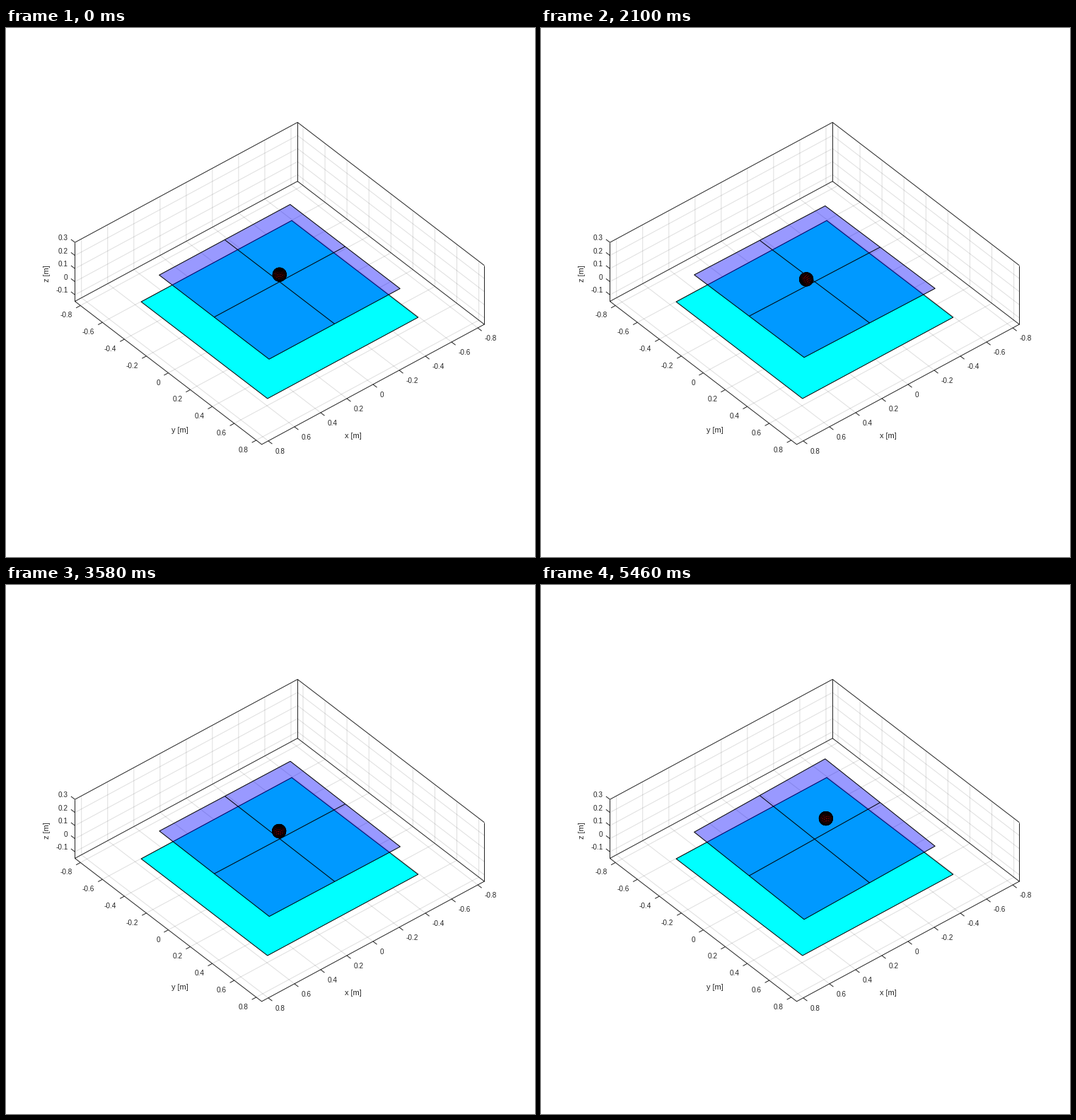
A matplotlib script that plays this animation: 748x748 px, repeating every 5.5 s.

```python
import numpy as np
import matplotlib.pyplot as plt
from matplotlib.animation import FuncAnimation
from matplotlib.collections import LineCollection, PolyCollection

SIZE, DPI = 748, 100
PX = 72 / DPI                      # one pixel in points
STEP, HOLD, TICK, LOOP = 40, 500, 20, 5500
POSES = 1 + (LOOP - HOLD) // STEP
DT = STEP / 1000

# Orthographic view
AZ, EL, SCALE = np.radians(140), np.radians(40), 241.7
ORIGIN = np.array([386.9, 375.0])
VIEW = SCALE * np.array([
    [np.cos(AZ), np.sin(AZ), 0],
    [np.sin(EL) * np.sin(AZ), -np.sin(EL) * np.cos(AZ), -np.cos(EL)]])
TO_EYE = np.array([np.cos(EL) * np.sin(AZ), -np.cos(EL) * np.cos(AZ), np.sin(EL)])

LIM, Z0, Z1 = 0.85, -0.15, 0.3
BASE, BASE_Z, PLATE, PLATE_Z = 0.575, -0.125, 0.5, 0.087
RADIUS, ROLL_G = 0.04, 7.0         # a ball rolls at 5/7 of gravity
INK = "#262626"

# Key poses: step, ball x and y, plate slope along x and y
KEYS = np.array([
    [0, -.011, -.014, 0, 0],
    [8, -.010, -.013, .010, .010],
    [35, .044, .001, -.010, -.021],
    [54, .055, -.050, -.020, .016],
    [78, -.012, -.019, -.005, .010],
    [95, -.094, .042, .006, -.037],
    [125, -.139, -.063, .020, .024]])


def solve_motion():
    """Smoothest plate slopes that roll a resting ball through the key poses."""
    n = np.arange(POSES)
    step = KEYS[:, 0].astype(int)
    start, path, slope = KEYS[0, 1:3], KEYS[:, 1:3], KEYS[:, 3:]
    roll = ROLL_G * DT ** 2 * np.maximum(n[:, None] - n, 0)
    smooth = np.diff(np.eye(POSES), 2, axis=0)
    lhs = np.vstack([1000 * roll[step], 200 * np.eye(POSES)[step], 400 * smooth])
    rhs = np.vstack([1000 * (path - start), 200 * slope, np.zeros((POSES - 2, 2))])
    slopes = np.linalg.lstsq(lhs, rhs, rcond=None)[0]
    return slopes, start + roll @ slopes


SLOPES, TRACK = solve_motion()


def project(points):
    return ORIGIN + np.asarray(points, float) @ VIEW.T


def rotation(vec):
    angle = np.linalg.norm(vec)
    if angle < 1e-9:
        return np.eye(3)
    x, y, z = vec / angle
    k = np.array([[0, -z, y], [z, 0, -x], [-y, x, 0]])
    return np.eye(3) + np.sin(angle) * k + (1 - np.cos(angle)) * k @ k


def sphere_quads(n=20):
    lo, la = np.meshgrid(np.linspace(-np.pi, np.pi, n + 1),
                         np.linspace(-np.pi / 2, np.pi / 2, n + 1))
    p = np.stack([np.cos(la) * np.cos(lo), np.cos(la) * np.sin(lo), np.sin(la)], -1)
    quads = np.stack([p[:-1, :-1], p[:-1, 1:], p[1:, 1:], p[1:, :-1]], 2)
    return quads.reshape(-1, 4, 3)


SPHERE = sphere_quads()
SQUARE = np.array([[-1, -1], [1, -1], [1, 1], [-1, 1], [-1, -1]])
CROSS = [np.array([[-1, 0], [1, 0]]), np.array([[0, -1], [0, 1]])]


def on_plate(shape, slope):
    # The plate pivots below its surface, so it also shifts sideways.
    xy = shape * PLATE
    return project(np.column_stack([xy + PLATE_Z * slope, PLATE_Z - xy @ slope]))


def ball_quads(pos):
    dx, dy = (pos - TRACK[0]) / RADIUS
    quads = SPHERE @ rotation(np.array([-dy, dx, 0])).T
    quads = quads[quads.mean(axis=1) @ TO_EYE > 0]
    return project(quads * RADIUS + [*pos, PLATE_Z + RADIUS])


fig = plt.figure(figsize=(SIZE / DPI, SIZE / DPI), dpi=DPI, facecolor="white")
ax = fig.add_axes([0, 0, 1, 1])
ax.set_xlim(0, SIZE)
ax.set_ylim(SIZE, 0)
ax.axis("off")


def add_lines(paths, z, color=INK, **style):
    lines = LineCollection(paths, colors=color, linewidths=PX, zorder=z, **style)
    return ax.add_collection(lines)


def add_faces(verts, color, z, **style):
    return ax.add_collection(PolyCollection(verts, facecolors=[color], zorder=z, **style))


def label(x, y, text, size=10, **style):
    ax.text(x, y, text, fontsize=size * PX, family="Liberation Sans",
            color=INK, **style)


def draw_axes():
    ticks = np.arange(-4, 5) / 5
    zticks = np.arange(-1, 4) / 10
    grid = []
    for v in ticks:
        grid.append([(v, LIM, Z0), (v, -LIM, Z0), (v, -LIM, Z1)])
        grid.append([(LIM, v, Z0), (-LIM, v, Z0), (-LIM, v, Z1)])
    for v in zticks[:-1]:
        grid.append([(LIM, -LIM, v), (-LIM, -LIM, v), (-LIM, LIM, v)])
    add_lines([project(g) for g in grid], 1, alpha=0.15)

    left, back, right, front = (LIM, -LIM), (-LIM, -LIM), (-LIM, LIM), (LIM, LIM)
    edges = [[(*c, Z0) for c in (left, back, right, front, left)],
             [(*c, Z1) for c in (left, back, right)]]
    edges += [[(*c, Z0), (*c, Z1)] for c in (left, back, right)]
    add_lines([project(e) for e in edges], 2)

    out_x, out_y = (VIEW[:, i] / np.hypot(*VIEW[:, i]) for i in (0, 1))
    marks = []

    def tick(point, out, dx, dy, value, align):
        p = project(point)
        marks.append([p, p + 7 * out])
        label(p[0] + dx, p[1] + dy + 3.6, f"{value:g}", ha=align, va="baseline")

    for v in ticks:
        tick((v, LIM, Z0), out_y, 9.7, 14.6, v, "left")
        tick((LIM, v, Z0), out_x, -11.2, 13.3, v, "right")
    for v in zticks:
        tick((LIM, -LIM, v), -out_y, -10, -6.4, v, "right")
    add_lines(marks, 2)

    label(490.5, 580, "x [m]", 11, ha="center", va="baseline")
    label(245.5, 572, "y [m]", 11, ha="center", va="baseline")
    label(58, 347, "z [m]", 11, ha="center", va="center", rotation=90)


draw_axes()
base = project(np.column_stack([SQUARE * BASE, np.full(len(SQUARE), BASE_Z)]))
add_faces([base], "cyan", 3, linewidths=0)
add_lines([base], 3.5, "black")
plate = add_faces([], (0, 0, 1, 0.4), 4, linewidths=0)
rims = add_lines([], 4.5, "black")
ball = add_faces([], "red", 5, edgecolors="black", linewidths=0.9 * PX)


def update(k):
    ms = k * TICK
    pose = 0 if ms < HOLD else 1 + (ms - HOLD) // STEP
    shapes = [on_plate(s, SLOPES[pose]) for s in (SQUARE, *CROSS)]
    plate.set_verts(shapes[:1])
    rims.set_segments(shapes)
    ball.set_verts(ball_quads(TRACK[pose]))
    return plate, rims, ball


anim = FuncAnimation(fig, update, frames=LOOP // TICK, interval=TICK,
                     repeat=True, repeat_delay=0)
plt.show()
```
